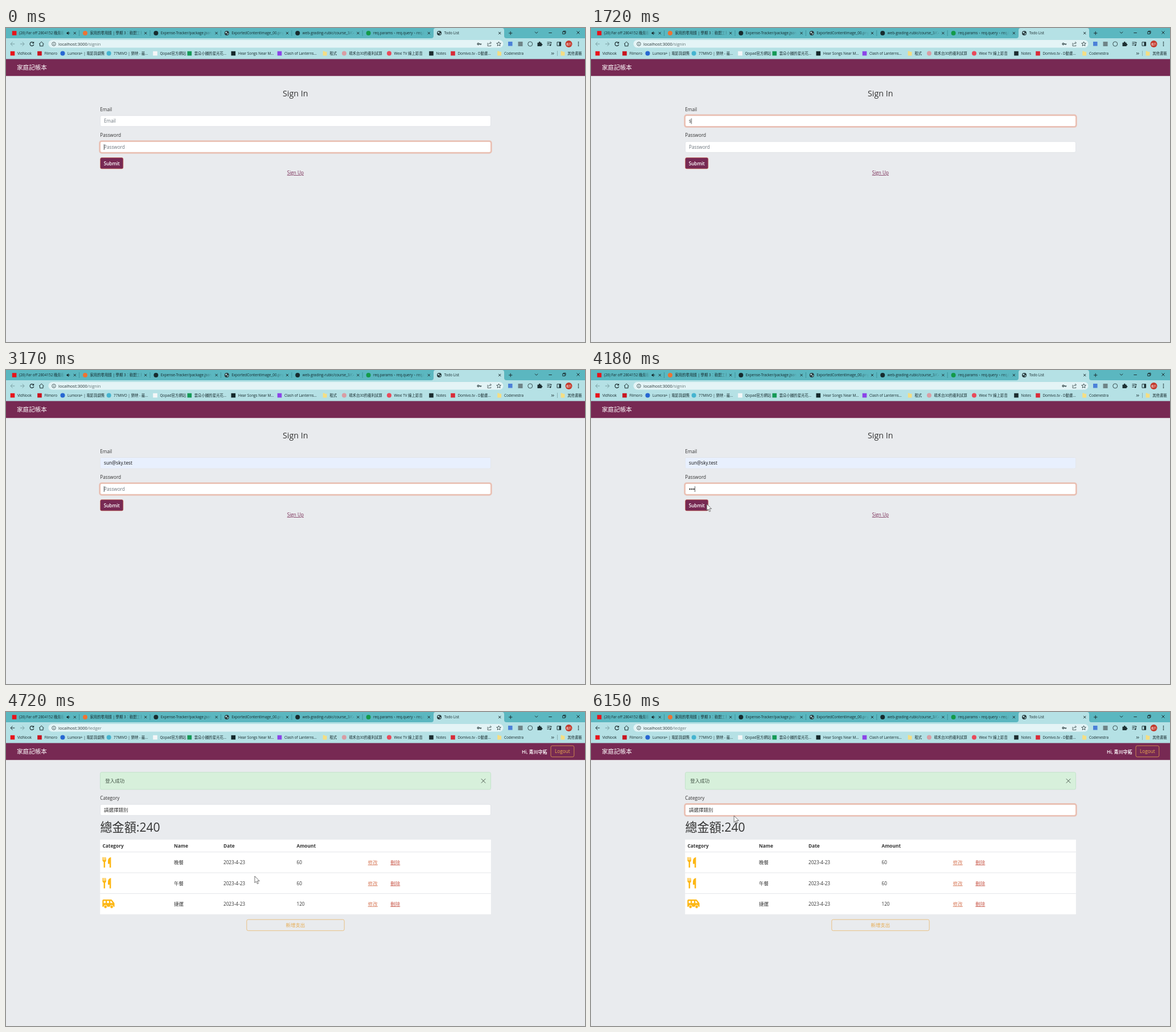
These frames come from a looping animation (1017 px wide and 551 px high, 8 s). An HTML page:

```html
<!DOCTYPE html>
<html lang="zh-Hant">
<head>
<meta charset="utf-8">
<title>Todo List</title>
<style>
html, body { margin: 0; width: 100%; height: 100%; overflow: hidden; background: #e9ebee; }
svg { display: block; }
text { font: 8.2px "Open Sans", "Noto Sans CJK TC", "Noto Sans CJK JP", "Noto Sans CJK", sans-serif; fill: #333; white-space: pre; }
.ui text { font-size: 6.4px; fill: #16292c; }
.ui .url { font-size: 7.55px; fill: #263436; }
.url tspan { fill: #657779; }
.line { fill: none; stroke: #1d2f32; }
.dim { stroke: #789da1; }
.box { fill: #fff; stroke: #d5d9de; stroke-width: .6; }
.ring { fill: none; stroke: #f0b3a0; stroke-width: .7; }
.halo { fill: none; stroke: #e95420; stroke-opacity: .28; stroke-width: 2.1; }
.mid { text-anchor: middle; }
.hint { fill: #6c757d; }
.cjk { font-size: 8.47px; }
.th { font-weight: 700; font-size: 8.3px; }
.link { text-decoration: underline; font-size: 8.47px; }
.edit { fill: #d98062; }
.del { fill: #c8584a; }
.raw .edit { fill: #7763a2; }
.raw .del { fill: #5c4248; }
.rawbtn { fill: #f1f0f2; stroke: #66646a; stroke-width: .9; }
.rawbtn.inner { stroke: #8a82a2; }
.food { fill: #fdb714; }

.email-ring, .pass-ring, .select-ring, .raw, .styled, .cursor, .caret { animation: 8s step-end infinite; }
.email-ring { animation-name: email-ring; }
.pass-ring { animation-name: pass-ring; }
.select-ring { animation-name: select-ring; }
.raw { animation-name: raw; }
.styled { animation-name: styled; }
.caret { animation-name: caret; }
.cursor { animation-name: cursor; }

@keyframes email-ring {
  0% { opacity: 0; } 17.375% { opacity: .6; } 18.375% { opacity: 1; }
  36.5% { opacity: .5; } 37.5%, 100% { opacity: 0; }
}
@keyframes pass-ring {
  0% { opacity: 1; } 17.375% { opacity: .4; } 18.375% { opacity: 0; }
  36.5% { opacity: .5; } 37.5%, 100% { opacity: 1; }
}
@keyframes select-ring {
  0% { opacity: 0; } 71.875% { opacity: .4; } 72.875%, 100% { opacity: 1; }
}
@keyframes raw {
  0% { opacity: 1; } 54.25% { opacity: .4; } 55.125%, 100% { opacity: 0; }
}
@keyframes styled {
  0% { opacity: 0; } 54.25% { opacity: .6; } 55.125%, 100% { opacity: 1; }
}
@keyframes caret {
  0% { opacity: 1; transform: translate(172.4px, 204px); }
  2% { opacity: 0; transform: translate(172.4px, 204px); }
  9.125% { opacity: 1; transform: translate(172.4px, 204px); }
  15.375% { opacity: 1; transform: translate(172.4px, 158.5px); }
  21.5% { opacity: 1; transform: translate(176.3px, 158.5px); }
  23.375% { opacity: 1; transform: translate(181.2px, 158.5px); }
  25.5% { opacity: 1; transform: translate(186.2px, 158.5px); }
  27.375% { opacity: 0; transform: translate(186.2px, 158.5px); }
  36.5% { opacity: 1; transform: translate(172.4px, 204px); }
  40.5% { opacity: 1; transform: translate(175.6px, 204px); }
  42.5% { opacity: 1; transform: translate(179px, 204px); }
  45.625% { opacity: 1; transform: translate(182.5px, 204px); }
  53.125%, 100% { opacity: 0; transform: translate(182.5px, 204px); }
}
@keyframes cursor {
  0% { opacity: 0; transform: translate(331px, 196px); }
  8.19% { opacity: 1; transform: translate(331px, 196px); }
  9.125% { opacity: 0; transform: translate(300px, 183px); }
  11.25% { opacity: 1; transform: translate(300px, 183px); }
  12.25% { opacity: 1; transform: translate(294px, 177px); }
  13.25% { opacity: 0; transform: translate(212px, 180px); }
  28.44% { opacity: 1; transform: translate(212px, 180px); }
  29.5% { opacity: 1; transform: translate(216.5px, 186.5px); }
  35.5% { opacity: 0; transform: translate(192px, 221px); }
  47.5% { opacity: 1; transform: translate(192px, 221px); animation-timing-function: steps(3); }
  50.5% { opacity: 1; transform: translate(203.3px, 235px); }
  55.125% { opacity: 1; transform: translate(205.5px, 237px); animation-timing-function: steps(5); }
  60% { opacity: 1; transform: translate(591px, 322px); animation-timing-function: steps(6); }
  65.75% { opacity: 1; transform: translate(205.5px, 154.5px); }
  66.875% { opacity: 1; transform: translate(228.2px, 171px); animation-timing-function: steps(3); }
  69.75% { opacity: 1; transform: translate(268px, 178.5px); animation-timing-function: steps(6); }
  76.875%, 100% { opacity: 1; transform: translate(251.2px, 182px); }
}
</style>
</head>
<body>
<svg width="1017" height="551" viewBox="0 0 1017 551">
  <defs>
    <linearGradient id="fade"><stop stop-color="#5bb7c0" stop-opacity="0"/><stop offset="1" stop-color="#5bb7c0"/></linearGradient>
    <g id="globe"><circle r="4" fill="#283a3d"/><path d="M-3-1.3L-.8-2.8L.6-1.4L-.6.2L-2 .3ZM.8.6L3 .1L2.2 2.2L.6 2.6Z" fill="#b9dfe3"/></g>
    <path id="folder" d="M-3.3-4h2.6l1 1.2h3.2v6.6h-6.8z" fill="#f5de83"/>
    <path id="x" d="M-2.1-2.1L2.1 2.1M2.1-2.1L-2.1 2.1" class="line"/>
    <g id="cutlery" class="food">
      <path d="M.3 0h1.2v5h1.1V0h1.4v5h1.1V0h1.2l.7 5.6q0 2.2-1.9 3v9.6H2.6V8.6Q.6 7.8.3 5.6Z"/>
      <path d="M15.4 0v18.2h-2.5v-6.4H10V6q.6-5 5.4-6z"/>
    </g>
  </defs>

  <g class="ui">
    <rect width="1017" height="55" fill="#b5e1e5"/>
    <rect width="1017" height="18" fill="#5bb7c0"/>
    <path d="M747 18q4 0 4-4V4q0-4 4-4h116q4 0 4 4v10q0 4 4 4z" fill="#b5e1e5"/>
    <g id="tabs"></g>
    <path d="M106.5 7.8h1.5l2-1.8v6l-2-1.8h-1.5z" fill="#16292c"/>
    <path d="M111 7.2q1.6 1.8 0 3.6" class="line" stroke-width=".7"/>
    <path class="line" d="M883 9h6.4M886.2 5.8v6.4M929 6.7l2.6 2.6l2.6-2.6M953.3 8.5h5.5M977.8 6.5h4v4h-4zM979 6.5v-1.2h4v4h-1.2M1002.5 5.5l5 5M1007.5 5.5l-5 5"/>

    <rect x="74.5" y="21" width="799" height="13.6" rx="6.8" fill="#e4f4f6"/>
    <path class="line dim" d="M15.3 28H8.3M11.6 24.5L8.1 28l3.5 3.5" data-on="0-4250"/>
    <path class="line" d="M15.3 28H8.3M11.6 24.5L8.1 28l3.5 3.5" data-on="4250-8000"/>
    <path class="line dim" d="M25 28h7M28.7 24.5l3.5 3.5l-3.5 3.5"/>
    <path class="line" d="M48.3 26A3.4 3.4 0 1 0 48.8 29" stroke-width="1.2"/>
    <path d="M49.2 23.8v3.5h-3.5z" fill="#1d2f32"/>
    <path class="line" d="M58 28.2l4.3-4l4.3 4M59.5 27.5v4.2h5.6v-4.2"/>
    <circle cx="84" cy="28" r="3.3" class="line" stroke-width=".7"/>
    <path class="line" d="M84 27.5v2.3M84 25.8v.9" stroke-width=".8"/>
    <text class="url" x="92" y="30.6" data-on="0-4250">localhost:3000<tspan>/signin</tspan></text>
    <text class="url" x="92" y="30.6" data-on="4250-8000">localhost:3000<tspan>/ledger</tspan></text>
    <circle cx="829.5" cy="28" r="1.5" class="line" stroke-width="1.2"/>
    <path class="line" d="M831 28h4.3M833.8 28v1.7" stroke-width="1.2"/>
    <path class="line" d="M846 26v5.5h5.7v-1.7M847.5 29q.5-3 4.3-3M850.3 24l2.2 2l-2.2 2" stroke-width=".7"/>
    <path class="line" d="M865.5 24l1.1 2.6l2.7.2l-2 1.8l.6 2.7l-2.4-1.4l-2.4 1.4l.6-2.7l-2-1.8l2.7-.2z" stroke-width=".8"/>
    <rect x="882" y="24" width="7.5" height="7.5" fill="#4b80d8"/>
    <rect x="899.5" y="24" width="8" height="8" fill="#6f8487"/>
    <circle cx="920.7" cy="28" r="4" class="line" stroke-width=".8"/>
    <path d="M933.5 25.8h2.2q0-2 1.5-2t1.5 2h2v2q1.7 0 1.7 1.4t-1.7 1.4v1.4h-7.2z" fill="#1d2f32"/>
    <path class="line" d="M950.5 25h7M950.5 27.5h4.5M950.5 30h3M957 25.5v4.5M957 25.5h1.5"/>
    <circle cx="956" cy="30.3" r="1.3" fill="#1d2f32"/>
    <path class="line" d="M968 24.8h6.6v6.4H968z"/><path d="M971.5 24.8h3v6.4h-3z" fill="#1d2f32"/>
    <circle cx="988.5" cy="28" r="6" fill="#c3392b"/>
    <text class="mid" x="988.5" y="29.7" style="fill:#fff;font-size:4.6px">帳戶</text>
    <g fill="#1d2f32"><circle cx="1005.5" cy="25" r=".9"/><circle cx="1005.5" cy="28" r=".9"/><circle cx="1005.5" cy="31" r=".9"/></g>
    <g id="marks"></g>
    <path class="line" d="M958 43l1.8 1.8l-1.8 1.8M960.5 43l1.8 1.8l-1.8 1.8"/>
    <path class="line dim" d="M968.5 40v9" stroke-width=".7"/>
  </g>

  <rect y="54.5" width="1017" height="29.7" fill="#772953"/>
  <text x="19" y="73" style="fill:#fff;font-size:10.6px">家庭記帳本</text>

  <g data-on="0-4250">
    <text class="mid" x="508.3" y="119.7" style="font-size:14.3px">Sign In</text>
    <text x="165.3" y="145.7">Email</text>
    <rect class="box" x="165.5" y="153.7" width="686" height="19" rx="2.6"/>
    <rect data-on="2275-4250" x="165.8" y="154" width="685.4" height="18.4" rx="2.4" fill="#e8f0fe"/>
    <g class="email-ring">
      <rect class="halo" x="164.4" y="152.6" width="688.2" height="21.2" rx="3.5"/>
      <rect class="ring" x="165.5" y="153.7" width="686" height="19" rx="2.6"/>
    </g>
    <text class="hint" x="172" y="166.3" data-on="0-1720">Email</text>
    <text x="172" y="166.3" data-on="1720-1870">s</text>
    <text x="172" y="166.3" data-on="1870-2040">su</text>
    <text x="172" y="166.3" data-on="2040-2275">sun</text>
    <text x="172" y="166.3" data-on="2275-2610" style="font:7.3px 'Liberation Sans',sans-serif;fill:#111">sun@sky.test</text>
    <text x="172" y="166.3" data-on="2610-4250" style="fill:#111">sun@sky.test</text>

    <text x="165.3" y="191.2">Password</text>
    <rect class="box" x="165.5" y="199.3" width="686" height="19" rx="2.6"/>
    <g class="pass-ring">
      <rect class="halo" x="164.4" y="198.2" width="688.2" height="21.2" rx="3.5"/>
      <rect class="ring" x="165.5" y="199.3" width="686" height="19" rx="2.6"/>
    </g>
    <text class="hint" x="172" y="211.9" data-on="0-3240">Password</text>
    <g fill="#333">
      <circle cx="173.7" cy="209" r="1.3" data-on="3240-4250"/>
      <circle cx="177.2" cy="209" r="1.3" data-on="3400-4250"/>
      <circle cx="180.7" cy="209" r="1.3" data-on="3650-4250"/>
    </g>
    <rect x="165.6" y="227.6" width="40.2" height="19.4" rx="2.6" fill="#772953" stroke="#d6684c" stroke-width=".6"/>
    <text class="mid" x="185.7" y="240.5" style="fill:#fff;font-weight:600">Submit</text>
    <text class="mid" x="508.4" y="257" style="fill:#772953;text-decoration:underline">Sign Up</text>
    <path class="caret" d="M0 0v10" stroke="#222" stroke-width=".8"/>
  </g>

  <g data-on="4250-8000">
    <g class="raw">
      <text x="906" y="72.5" style="fill:#53283f">Hi, 青川守拓</text>
      <rect x="957.2" y="59.4" width="40.3" height="19.4" rx="2.6" fill="#d5bfcb"/>
      <text class="mid" x="977.3" y="72.3" style="fill:#40263a">Logout</text>
    </g>
    <g class="styled">
      <text x="906" y="72.5" style="fill:#fff;font-weight:600;font-size:8px">Hi, 青川守拓</text>
      <rect x="957" y="59.2" width="40.8" height="19.6" rx="2.6" fill="none" stroke="#e2a14f" stroke-width=".8"/>
      <text class="mid" x="977.3" y="72.3" style="fill:#edb04d">Logout</text>
    </g>

    <rect x="165.5" y="105.7" width="686" height="30.2" rx="2.6" fill="#d7f0db" stroke="#bbdfc2" stroke-width=".7"/>
    <text class="cjk" x="174.3" y="124.2" style="fill:#455648">登入成功</text>
    <path class="line" d="M834.8 117.2l7.4 7.4M842.2 117.2l-7.4 7.4" style="stroke:#4b584e"/>
    <text x="165.3" y="154.3">Category</text>
    <rect class="box" x="165.5" y="162.2" width="686" height="19.2" rx="2.6"/>
    <rect class="raw" x="165.5" y="162" width="686" height="19.5" rx="2.6" fill="none" stroke="#8b8d91" stroke-width=".8"/>
    <g class="select-ring">
      <rect class="halo" x="164.4" y="161.1" width="688.2" height="21.4" rx="3.5"/>
      <rect class="ring" x="165.5" y="162.2" width="686" height="19.2" rx="2.6"/>
    </g>
    <text class="cjk" x="172" y="174.9">請選擇類別</text>
    <text x="165.5" y="210.3" style="font-size:21.1px;font-weight:300">總金額<tspan font-weight="400">:240</tspan></text>

    <rect x="165.3" y="224" width="686.5" height="131" fill="#fff"/>
    <text class="th" x="169.5" y="238">Category</text>
    <text class="th" x="295" y="238">Name</text>
    <text class="th" x="382" y="238">Date</text>
    <text class="th" x="510.5" y="238">Amount</text>
    <g id="rows"></g>
    <g data-on="4340-8000">
      <use href="#cutlery" x="169" y="254.7"/>
      <use href="#cutlery" x="169" y="291.2"/>
      <g transform="translate(169.3 329)">
        <path class="food" d="M2 0h13q1.3 0 2 1l3.5 4.5q.8.8.8 2v5.2H0V2q0-2 2-2z"/>
        <path d="M2.3 2.6h3.4v3.6H2.3zM8 2.6h3.6v3.6H8zM14 2.6h1.3l2.7 3.6h-4z" fill="#fff"/>
        <g class="food" stroke="#fff" stroke-width=".9"><circle cx="5.4" cy="12.8" r="2.8"/><circle cx="16.3" cy="12.8" r="2.8"/></g>
      </g>
    </g>

    <g class="raw">
      <rect x="422.8" y="364.2" width="171.4" height="19.5" rx="2.6" fill="none" stroke="#a0708a" stroke-width=".8"/>
      <text class="cjk mid" x="508.4" y="377.2" style="fill:#8b5573">新增支出</text>
    </g>
    <g class="styled">
      <rect x="422.8" y="364.2" width="171.4" height="19.5" rx="2.6" fill="none" stroke="#e9b569" stroke-width=".8"/>
      <text class="cjk mid" x="508.4" y="377.2" style="fill:#e6ac52">新增支出</text>
    </g>
  </g>

  <path class="cursor" d="M0 0v11.7l2.7-2.5l1.9 4.3l1.9-.8l-1.9-4.2h3.7z" fill="#fff" stroke="#333" stroke-width=".7"/>
</svg>

<script>
const LOOP = 8000;
const $ = id => document.getElementById(id);

// A colour gives a square, a colour with "o" a disc, anything else a symbol.
const icon = (x, y, kind) =>
  kind[0] !== '#' ? `<use href="#${kind}" x="${x}" y="${y}"/>` :
  kind.endsWith('o') ? `<circle cx="${x}" cy="${y}" r="4" fill="${kind.slice(0, -1)}"/>` :
  `<rect x="${x - 3.8}" y="${y - 3.8}" width="7.6" height="7.6" fill="${kind}"/>`;

const tabs = [
  ['#e8131b', '(26) Far off 2804152 晚風樹'],
  ['#ed7434o', '家用的零用錢 | 學期 3：軟體工程'],
  ['#172b2eo', 'Expense-Tracker/package.json at'],
  ['globe', 'ExportedContentImage_00.png'],
  ['#172b2eo', 'web-grading-rubic/course_3/C4'],
  ['#139a49o', 'req.params、req.query、req.body'],
  ['globe', 'Todo List']
];
$('tabs').innerHTML = tabs.map(([kind, title], i) => {
  const x = 14.6 + i * 124.4, w = i ? 90 : 80, open = i === 6;
  return icon(x, 9, kind) +
    `<svg x="${x + 8.4}" width="${w}" height="18"><text y="11.4">${title}</text>` +
    (open ? '' : `<rect x="${w - 13}" width="13" height="18" fill="url(#fade)"/>`) + '</svg>' +
    `<use href="#x" x="${x + 106.2}" y="9"/>` +
    (i < 5 ? `<path d="M${x + 114} 4v10" stroke="#34868f" stroke-width=".7"/>` : '');
}).join('');

const marks = [
  [11.5, '#e8131b', 'VidNook'],
  [59, '#c91520', 'Filmoro'],
  [99.5, '#2767d2o', 'Lumora+ | 電影與劇集'],
  [180.7, '#45b4d0o', '77MIVO | 樂映 - 最...'],
  [262, '#f4f7f8', 'Qopad官方網站'],
  [322.3, '#169a57', '雲朵小舖的星光花...'],
  [399.3, '#14282b', 'Hear Songs Near M...'],
  [480.5, '#8c45e8', 'Clash of Lanterns...'],
  [560, 'folder', '程式'],
  [594, '#d99da4o', '晴禾台30的複利試算'],
  [673, '#e94a5bo', 'Wexi TV 線上影音'],
  [747, '#1c2d30', 'Notes'],
  [785, '#d92b38', 'Domivo.tv - D動畫...'],
  [866.5, 'folder', 'Codenestra'],
  [977.8, 'folder', '其他書籤']
];
$('marks').innerHTML = marks.map(([x, kind, name]) =>
  icon(x, 44.6, kind) + `<text x="${x + 8.4}" y="47">${name}</text>`).join('');

const rows = [['晚餐', 60], ['午餐', 60], ['捷運', 120]];
$('rows').innerHTML = rows.map(([name, amount], i) => {
  const y = 264 + i * 36.5, base = y + 3.1;
  const button = (x, half, w, kind = '') =>
    `<rect class="rawbtn ${kind}" x="${x}" y="${y - half}" width="${w}" height="${half * 2}" rx="2.6"/>`;
  const links = `<text class="link edit" x="635.7" y="${base}">修改</text>
    <text class="link del" x="675.3" y="${base}">刪除</text>`;
  return `<path d="M165.3 ${y - 18.4}h686.5" stroke="#d9dce0" stroke-width=".7"/>
    <text class="cjk" x="295" y="${base}">${name}</text>
    <text x="382" y="${base}">2023-4-23</text>
    <text x="510.5" y="${base}">${amount}</text>
    <g class="raw">${button(622.3, 13.5, 43.4)}${button(628.7, 9.8, 30.7, 'inner')}${button(668.9, 9.8, 30.1)}${links}</g>
    <g class="styled">${links}</g>`;
}).join('');

// Each data-on="from-to" (ms) becomes a hard on/off keyframe rule.
const sheet = document.createElement('style');
document.querySelectorAll('[data-on]').forEach((el, i) => {
  const [from, to] = el.dataset.on.split('-').map(Number);
  const key = (ms, v) => `${ms / LOOP * 100}% { opacity: ${v}; }`;
  sheet.textContent += `@keyframes on${i} { ${from ? key(0, 0) : ''} ${key(from, 1)} ${to < LOOP ? key(to, 0) : ''} }\n`;
  el.style.animation = `on${i} ${LOOP}ms step-end infinite`;
});
document.head.append(sheet);
</script>
</body>
</html>
```
